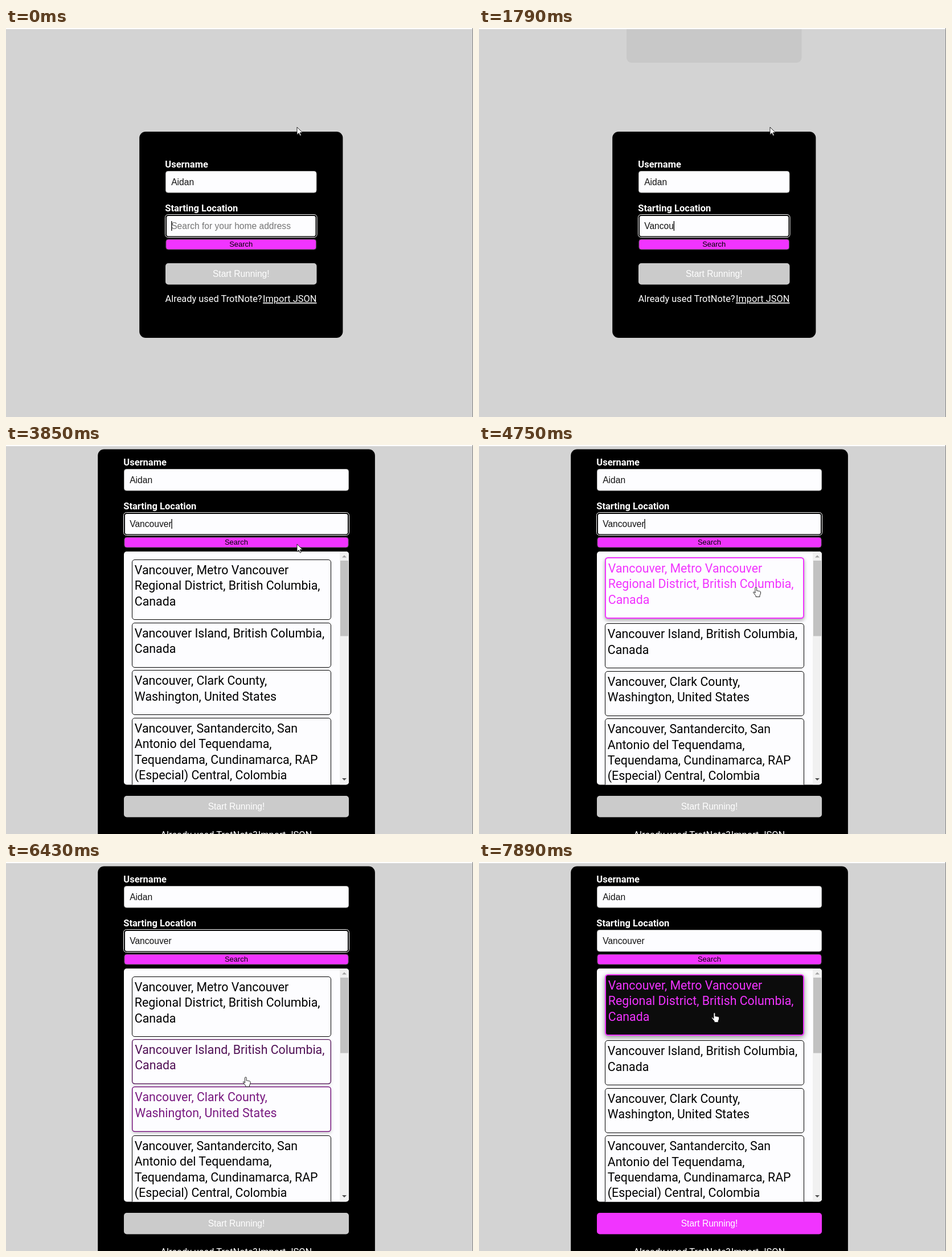
Recreate the animation shown at these times as an HTML page. Size 820 px wide and 683 px high, loop 8000 ms.

```html
<!DOCTYPE html>
<html lang="en">
<head>
<meta charset="utf-8">
<title>Starting location search</title>
<style>
  html, body { margin: 0; width: 100%; height: 100%; overflow: hidden; background: #d3d3d3; }
  svg { display: block; width: 820px; height: 683px; }
  text { white-space: pre; }
  .label { font: bold 16.5px Roboto, sans-serif; fill: #fff; }
  .foot { font: 16.4px Roboto, sans-serif; fill: #fff; }
  .link { text-decoration: underline; text-anchor: end; }
  .field { font: 15.6px "Liberation Sans", Arial, sans-serif; fill: #111; }
  .hint { fill: #757575; }
  .small { font: 13px "Liberation Sans", Arial, sans-serif; text-anchor: middle; }
  .start { font: 15.6px "Liberation Sans", Arial, sans-serif; fill: #fff; text-anchor: middle; }
  .item { font: 21.35px Roboto, sans-serif; }
</style>
</head>
<body>
<svg id="stage" viewBox="0 0 820 683"></svg>
<script>
const LOOP = 8000;
const PINK = [241, 52, 255];
const PAPER = '#fdfdff';
const stage = document.getElementById('stage');

const KEYS = [560, 690, 980, 1520, 1670, 1790, 1920, 2190, 2340];
const PATH = [[4340, 511, 174], [4750, 486, 249], [5020, 457, 270], [5170, 462, 304],
  [5680, 433, 391], [5880, 425, 395], [6150, 424, 430], [6400, 421, 385], [6850, 413, 268],
  [6970, 413, 264]];

const PLACES = [
  ['Vancouver, Metro Vancouver', 'Regional District, British Columbia,', 'Canada'],
  ['Vancouver Island, British Columbia,', 'Canada'],
  ['Vancouver, Clark County,', 'Washington, United States'],
  ['Vancouver, Santandercito, San', 'Antonio del Tequendama,',
   'Tequendama, Cundinamarca, RAP', '(Especial) Central, Colombia']
];
const LINE = 27.4, PAD = 24, GAP = 4.7, LIST_TOP = 201;

// dy moves the upper form, low moves the button below the results
const LAYOUTS = [
  { from: 0, x: 280, w: 265.5, dy: 0, low: 0, foot: 481 },
  { from: 3300, x: 280, w: 265.5, dy: -9.5, low: 9.5, foot: 490, top: 383.5, h: 19.5 },
  { from: 3570, x: 207, w: 395, dy: -209, low: 203, foot: 689.7, top: 187, h: 409.5, list: true }
];

const clamp = v => Math.max(0, Math.min(1, v));
const smooth = v => { v = clamp(v); return v * v * (3 - 2 * v); };
const rgb = (c, k = 1) => `rgb(${c.map(v => Math.round(v * k))})`;
const rect = (x, y, w, h, r, fill, more = '') =>
  `<rect x="${x}" y="${y}" width="${w}" height="${h}" rx="${r}" fill="${fill}" ${more}/>`;
const text = (x, y, s, cls, more = '') =>
  `<text x="${x}" y="${y}" class="${cls}" ${more}>${s}</text>`;
const tri = (x, y, d, fill) => `<path d="M${x - 4} ${y}h8l-4 ${d}z" fill="${fill}"/>`;

function pointerAt(t) {
  const n = PATH.findIndex(p => p[0] > t);
  if (n < 1) return (n ? PATH[PATH.length - 1] : PATH[0]).slice(1);
  const [a, b] = [PATH[n - 1], PATH[n]];
  const k = (t - a[0]) / (b[0] - a[0]);
  return [1, 2].map(i => a[i] + (b[i] - a[i]) * k);
}

function hovered(t) {
  const y = pointerAt(t)[1];
  let top = LIST_TOP;
  return PLACES.findIndex(lines => {
    const bottom = top + PAD + LINE * lines.length;
    const hit = y >= top && y <= bottom;
    top = bottom + GAP;
    return hit;
  });
}

// Share of the last 180 ms the pointer spent on item i
function hoverAmount(i, t) {
  let hits = 0;
  for (let k = 0; k < 18; k++) hits += hovered(t - k * 10) === i;
  return smooth(hits / 18);
}

function items(t) {
  const press = smooth((t - 7440) / 520);
  let y = LIST_TOP, out = '';
  PLACES.forEach((lines, i) => {
    const h = hoverAmount(i, t), b = 1 + h;
    const lifted = y - 4 * h;
    const top = Math.round(lifted);
    const tall = Math.round(PAD + LINE * lines.length + 1.5 * h);
    const dark = i === 0 ? press : 0;
    if (h) out += rect(221, top + 3, 350, tall, 5, '#000',
      `opacity="${(.35 + .1 * dark) * h}" style="filter:blur(${3 + 2 * dark}px)"`);
    out += rect(221 + b / 2, top + b / 2, 350 - b, tall - b, 4.5,
      rgb([253, 253, 255], 1 - dark), `stroke="${rgb(PINK, h)}" stroke-width="${b}"`);
    lines.forEach((s, n) => {
      out += text(225.8 + h, lifted + 25.8 + h + LINE * n, s, 'item', `fill="${rgb(PINK, h)}"`);
    });
    y += PAD + GAP + LINE * lines.length + 1.5 * h;
  });
  return out;
}

function results({ x, w, top, h, list }, t) {
  const paper = rect(x, top, w, h, 5, PAPER);
  if (!list) return paper;
  return paper + `<clipPath id="clip">${paper}</clipPath><g clip-path="url(#clip)">`
    + items(t)
    + rect(586, top, 16, h, 0, '#f1f1f1')
    + rect(587, 203, 14, 132.5, 0, '#c1c1c1')
    + tri(594, 197.5, -4, '#a3a3a3') + tri(594, 585, 4, '#505050') + '</g>';
}

function pointer(t) {
  const [x, y] = pointerAt(t);
  const hand = hovered(t) >= 0;
  const d = hand
    ? 'M4 11V2.2a1.4 1.4 0 0 1 2.8 0V7l1-.3 1.5.6.9-.2 1.4.7 1-.1 1 1V12l-1.5 3v2.5H5.2V15.6L1 10.4q-.6-1.2.4-1.6t2.6 2.2z'
    : 'M0 0V13.4L3.2 10.5 5.4 15.3 7.4 14.4 5.3 9.8H9.6z';
  return `<path transform="translate(${hand ? x - 5 : x} ${y})" d="${d}" fill="#fff" stroke="#111" stroke-width=".9" stroke-linejoin="round"/>`;
}

function draw(t) {
  const L = LAYOUTS.filter(l => l.from <= t).pop();
  const { x, w, dy, low, foot } = L;
  const mid = x + w / 2;
  const pressed = KEYS.filter(k => k <= t);
  const typed = 'Vancouver'.slice(0, pressed.length);
  const focus = t < 7500;
  // The caret blink restarts with every key
  const blink = (t - (pressed.pop() ?? -200)) % 1030 < 500;
  const toast = t < 300 ? 0 : .62 * clamp(1 - (t - 1360) / 480);
  const cardTop = Math.max(7.6, 182 + dy);
  const input = y => rect(x + .5, y + .5, w - 1, 37.5, 4, PAPER, 'stroke="#b5b5b5"');

  let out = rect(0, 0, 820, 683, 0, '#d3d3d3');
  if (toast) out += rect(259, -20, 307.5, 81, 9, '#202124', `opacity="${toast}"`);
  out += rect(0, 0, 820, 2, 0, '#fff') + rect(819, 0, 1, 683, 0, '#858585')
    + rect(x - 45.8, cardTop, w + 91.7, 544 + low - cardTop, 11, '#000');

  out += `<g transform="translate(0 ${dy})">`
    + text(x - .7, 244.8, 'Username', 'label')
    + input(251)
    + text(x + 10.2, 275.6, 'Aidan', 'field')
    + text(x - .7, 322, 'Starting Location', 'label');
  out += focus
    ? rect(x - .5, 327.5, w + 1, 40, 5, '#000', 'stroke="#fff"')
      + rect(x + 2, 330, w - 4, 35.5, 3, PAPER)
    : input(328);
  out += text(x + 10.2, 353, typed || 'Search for your home address',
      typed ? 'field' : 'field hint', 'id="query"')
    + rect(x + .8, 371, w - 1.6, 18, 4, rgb(PINK), 'stroke="#444"')
    + text(mid, 384.2, 'Search', 'small')
    + (focus && blink ? rect(x + 10.2, 339, 1.3, 17, 0, '#000', 'id="caret"') : '')
    + '</g>';

  if (L.top) out += results(L, t);

  out += rect(x, 413 + low, w, 37.5, 5, t < 7620 ? '#cbcbcb' : rgb(PINK))
    + text(mid, 436.5 + low, 'Start Running!', 'start')
    + text(mid - 133.2, foot, 'Already used TrotNote?', 'foot')
    + text(mid + 132.8, foot, 'Import JSON', 'foot link');

  stage.innerHTML = out + pointer(t);

  const caret = document.getElementById('caret');
  if (caret && typed) {
    const end = document.getElementById('query').getComputedTextLength();
    caret.setAttribute('x', x + 10 + end);
  }
}

const start = performance.now();
function frame(now) {
  draw(Math.max(0, now - start) % LOOP);
  requestAnimationFrame(frame);
}
draw(0);
requestAnimationFrame(frame);
</script>
</body>
</html>
```
